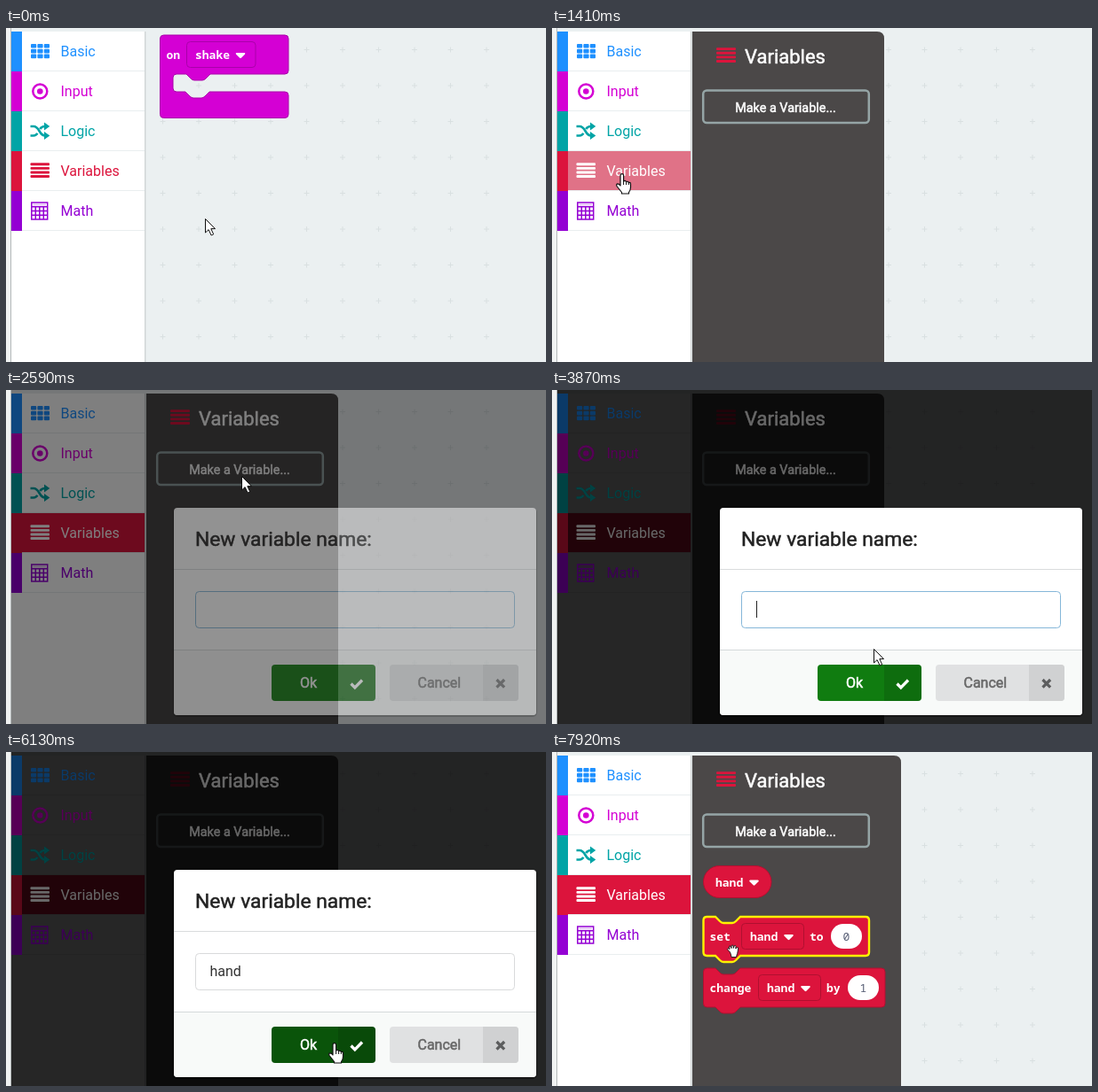
Animation, 608 px wide and 377 px high, one loop 8000 ms. Source, as an HTML page:

```html
<!DOCTYPE html>
<html lang="en">
<head>
<meta charset="utf-8">
<title>Make a variable</title>
<style>
  html, body { margin: 0; width: 100%; height: 100%; overflow: hidden; background: #ebf0f1; }
  svg { display: block; width: 608px; height: 377px; }
  text { font: 16px Roboto, sans-serif; white-space: pre; }
  .heavy { stroke: currentColor; stroke-width: .5px; fill: currentColor; }
  .block text { font: 700 13px "Noto Sans Mono", monospace; fill: #fff; }
  .block text.num { font-weight: 400; fill: #575e75; }
  .row.on { color: #fff; }
  .row text, .solid { fill: currentColor; }
  .line { fill: none; stroke: currentColor; }
</style>
</head>
<body>
<svg id="stage" viewBox="0 0 608 377" xmlns="http://www.w3.org/2000/svg"></svg>
<script>
const LOOP = 8000;
const RED = '#dc143c';
const $ = id => document.getElementById(id);
const repeat = (n, fn) => Array.from({ length: n }, (_, i) => fn(i)).join('');

const rect = (x, y, w, h, fill, extra = '') =>
  `<rect x="${x}" y="${y}" width="${w}" height="${h}" fill="${fill}" ${extra}/>`;
const path = (d, extra = '') => `<path d="${d}" ${extra}/>`;
const label = (x, y, s, extra = '') => `<text x="${x}" y="${y}" ${extra}>${s}</text>`;
const heavy = (x, y, s, size, color, extra = '') =>
  label(x, y, s, `class="heavy" style="font-size:${size}px;color:${color}" ${extra}`);
const bars = (x, y, w) => repeat(4, i => rect(x, y + i * 4.6, w, 2.9, 'currentColor', 'rx="1"'));

// Toolbox
const icons = [
  repeat(9, i => rect(28 + i % 3 * 7.4, 18 + Math.floor(i / 3) * 5.8, 6.2, 4.6, 'currentColor', 'rx="1"')),
  '<circle class="line" cx="38.3" cy="71.5" r="8" stroke-width="2.5"/><circle class="solid" cx="38.3" cy="71.5" r="3.3"/>',
  path('M27.5 111H31C38 111 37 121.5 44 121.5M27.5 121.5H31Q34 121.5 35.3 118.8M38.3 114Q40 111 44 111', 'class="line" stroke-width="2.6"') +
    path('M43 106.5 49.3 111 43 115.5ZM43 117 49.3 121.5 43 126Z', 'class="solid"'),
  bars(27.5, 152.3, 21.5),
  path('M28.8 197H46.7V216H28.8ZM28.8 201.8H46.7M28.8 206.5H46.7M28.8 211.3H46.7M33.3 201.8V216M37.8 201.8V216M42.3 201.8V216', 'class="line" stroke-width="1.5"') +
    rect(30.5, 198.5, 14.5, 1.8, 'currentColor', 'opacity=".25"')
];
const rows = [['Basic', '#1e90ff'], ['Input', '#d400d4'], ['Logic', '#00a4a6'], ['Variables', RED], ['Math', '#9400d3']];
const toolbox = rect(6, 4, 150, 373, '#fff') +
  rect(156, 4, 1, 373, '#cfd4d5') + rect(157, 4, 1, 373, '#e0e5e6') +
  repeat(5, i => rect(18, 48 + i * 45, 138, 1, '#e9eeef')) +
  rect(18, 139, 138, 44, RED, 'id="rowFill"') +
  '<g id="ink">' + rows.map(([name, color], i) =>
    rect(6, 4 + i * 45, 12, 45, color) +
    `<g class="row" ${i === 3 ? 'id="varRow"' : ''} color="${color}">${icons[i]}${label(61.5, 32 + i * 45, name)}</g>`
  ).join('') + '</g>';

// Blocks
const arrow = (x, y) => path(`M${x} ${y}h9q1.6.4.4 1.8l-4 4q-.9.8-1.8 0l-4-4q-1.2-1.4.4-1.8Z`, 'fill="#fff"');
const field = (x, y, w, name, edge) =>
  rect(x + .5, y + .5, w, 29, 'none', `rx="4" stroke="${edge}"`) +
  label(x + 10, y + 20, name) + arrow(x + w - 21, y + 13);
const statement = (id, y, w, word, fx, prep, px, num) => `<g id="${id}">` +
  path(`M170.5 ${y + 4}q0-4 4-4h9.5l5 5q2 2 4 2h10q2 0 4-2l5-5h${w - 46}q4 0 4 4v36q0 4-4 4h-${w - 46}l-5 5q-2 2-4 2h-10q-2 0-4-2l-5-5h-9.5q-4 0-4-4Z`,
    `class="edge" fill="${RED}"`) +
  label(177.5, y + 27, word) + field(fx, y + 7, 70, 'hand', '#b01030') +
  label(px, y + 27, prep) +
  rect(px + 24, y + 8, 35, 28, '#fff', 'rx="14"') + label(px + 37.5, y + 27, num, 'class="num"') + '</g>';

const shakeBlock = '<g class="block">' +
  path('M173.5 12q0-4 4-4H314q4 0 4 4V48q0 4-4 4H230l-5 5q-2 2-4 2H212q-2 0-4-2l-5-5H192q-4 0-4 4V68q0 4 4 4H202l5 5q2 2 4 2H220q2 0 4-2l5-5H314q4 0 4 4V97.500q0 4-4 4H177.500q-4 0-4-4Z',
    'fill="#d400d4" stroke="#aa00aa"') +
  label(180.5, 35, 'on') + field(203, 15, 77.5, 'shake', '#aa00aa') + '</g>';

const variableBlocks = '<g id="blocks" class="block">' +
  rect(170.5, 128.5, 76.500, 36, RED, 'rx="18" stroke="#b01030"') + label(184, 151.5, 'hand') + arrow(223, 144.5) +
  statement('setBlock', 186, 187, 'set', 213, 'to', 290, '0') +
  statement('changeBlock', 244, 205, 'change', 232, 'by', 309, '1') + '</g>';

const flyout = '<g id="flyout">' +
  path('', 'id="panel" fill="#4b4848"') +
  `<g color="${RED}">${bars(185, 22.2, 22)}</g>` +
  rect(170.2, 70.5, 186.600, 36.500, 'none', 'id="make" rx="4" stroke="#95a5a6" stroke-width="2.5"') +
  '<g id="panelText">' + heavy(217, 39.5, 'Variables', 22, '#fff') +
  heavy(263, 94.5, 'Make a Variable...', 14.4, '#fff', 'text-anchor="middle"') + '</g>' +
  variableBlocks + '</g>';

// Dialog
const dialog = '<g id="dialog">' +
  rect(188, 133, 410, 236, '#000', 'rx="5" opacity=".35"') +
  rect(189, 133, 408, 234, '#fff', 'rx="4"') +
  path('M189 293H597V363q0 4-4 4H193q-4 0-4-4Z', 'fill="#f8faf9"') +
  rect(189, 202, 408, 1, '#d9dcdd') + rect(189, 293, 408, 1, '#d5d9da') +
  heavy(213, 175.5, 'New variable name:', 22.8, '#222', 'stroke-width=".4"') +
  rect(213.5, 227.5, 359, 41, '#fff', 'id="input" rx="4"') +
  label(229.5, 253, '', 'id="typed" fill="#333"') + rect(230, 238, 1, 19, '#222', 'id="caret"') +
  rect(299, 310, 117, 41, '#107c10', 'id="ok" rx="4"') +
  path('M374 310H412q4 0 4 4V347q0 4-4 4H374Z', 'fill="#000" opacity=".12"') +
  heavy(331, 336, 'Ok', 16, '#fff') +
  path('M388.500 331.500l4.300 4.300 8.200-8.300', 'fill="none" stroke="#fff" stroke-width="3.3"') +
  rect(432, 310, 145, 41, '#e0e1e2', 'rx="4"') +
  path('M537 310H573q4 0 4 4V347q0 4-4 4H537Z', 'fill="#d0d1d2"') +
  heavy(463.500, 336, 'Cancel', 16, '#666', 'style="stroke-width:.3px"') +
  path('M552.500 327l8.600 8.600m0-8.600l-8.600 8.600', 'stroke="#5c5d5e" stroke-width="3.2"') + '</g>';

// Pointers, with the hot spot of each as its origin
const pointers = '<g id="pointer" fill="#fff" stroke="#111" stroke-linejoin="round">' +
  path('M.5.5V16l3.600-3.400 3 6.400 2.600-1.200-2.900-6.200H11.500Z', 'id="arrow"') +
  '<g id="hand" transform="translate(-7 0)">' +
  path('M5 14V2.500a1.800 1.800 0 0 1 3.600 0V9q1.700-1.400 3 .6 1.800-1 2.700.8 2.200-.6 2.200 1.800V16q0 3-2 5.500V23H6.500V21.500Q4.500 19 1 14.500 0 12 2 11.800q1.500 0 3 2.200Z', 'stroke-width="1.2"') +
  path('M8.600 9v4M11.600 10v3M14.300 11v2', 'fill="none"') + '</g>' +
  path('M3.500 9 1.200 6.600Q0 5 1.200 4.600 2 4.400 3 5.600L2.500 3Q2.600 1.300 4 2.200L5 4.500V1.700Q6 .2 7 1.500L7.300 4.400 8.300 1.600Q9.800.8 10 2.400L9.800 5 11.200 3.600Q13 3.200 12.700 5L11.700 10.500Q10.800 12 10.600 14.500H5Q4.800 12 3.500 9Z',
    'id="grab" transform="translate(-7 -7)" stroke-width=".9"') + '</g>';

const grid = repeat(10 * 9, i => `M${173.5 + i % 10 * 40.5} ${24.5 + Math.floor(i / 10) * 40.5}h6m-3-3v6`);

$('stage').innerHTML = rect(0, 0, 608, 377, '#ebf0f1') +
  path(grid, 'stroke="#d9e0e1" fill="none"') + shakeBlock + flyout + toolbox +
  rect(6, 0, 602, 377, '#000', 'id="dim"') +
  '<g id="ghost" opacity=".3"><use href="#ink"/><use href="#panelText"/></g>' +
  rect(0, 0, 5, 377, '#f1f3f3') + rect(5, 0, 1, 377, '#b3b8b9') + dialog + pointers;

// Pointer path: time, x, y
const moves = [
  [0, 224, 215], [60, 224, 215], [440, 79, 164],
  [1440, 79, 164], [1560, 110, 170], [1990, 264, 108], [2070, 264, 106], [2290, 265, 96],
  [2850, 265, 98], [3340, 274, 236], [3700, 274, 236], [3870, 362, 292],
  [5200, 362, 292], [5310, 362, 295], [5440, 362, 295], [5910, 370, 328],
  [6600, 370, 328], [6870, 249, 306], [7150, 170, 240], [7390, 183, 214],
  [7740, 183, 214], [7920, 204, 224], [LOOP, 204, 224]
];

// Moments at which the picture switches
const at = {
  select: 1030, open: 1110, fade: 2590, ask: 2670, press: 6050, close: 6190
};
const keys = [4490, 4550, 4710, 4770];
const caretOn = [[2670, 3040], [3570, 4100], [4490, 5300], [5830, 6050]];

function pointerAt(t) {
  const i = Math.max(1, moves.findIndex(m => m[0] > t));
  const [t0, x0, y0] = moves[i - 1], [t1, x1, y1] = moves[i];
  const k = (t - t0) / (t1 - t0);
  return [Math.round(x0 + (x1 - x0) * k), Math.round(y0 + (y1 - y0) * k)];
}

const set = (id, attrs) => {
  for (const name in attrs) $(id).setAttribute(name, attrs[name]);
};
const show = (id, on) => set(id, { display: on ? 'inline' : 'none' });

function render(t) {
  const [x, y] = pointerAt(t);
  const inside = (l, top, r, b) => x >= l && x < r && y >= top && y < b;
  const selected = t >= at.select, asking = t >= at.fade && t < at.close, done = t >= at.close;
  const settled = asking && t >= at.ask;

  const onRow = !asking && inside(6, 139, 156, 184);
  const onMake = !asking && selected && inside(169, 70, 358, 109);
  const onOk = asking && inside(299, 310, 416, 351);
  const onSet = done && inside(170, 186, 357, 231);
  const onChange = done && inside(170, 244, 375, 289);

  show('rowFill', selected);
  set('rowFill', { fill: onRow ? '#e07287' : RED });
  set('varRow', { class: selected ? 'row on' : 'row' });

  show('flyout', t >= at.open);
  show('blocks', done);
  set('panel', { d: `M156 4H${done ? 385 : 366}q8 0 8 8V377H156Z` });
  set('make', { fill: onMake ? '#95a5a6' : 'none' });
  for (const [id, on] of [['setBlock', onSet], ['changeBlock', onChange]]) {
    $(id).querySelector('.edge').setAttribute('style', on ? 'stroke:#fff200;stroke-width:2.4' : 'stroke:#b01030');
  }

  show('dim', asking);
  set('dim', { opacity: settled ? .85 : .5 });
  show('ghost', settled);
  show('dialog', asking);
  set('dialog', { opacity: settled ? 1 : .5 });

  const pressed = t >= at.press;
  const count = keys.filter(k => t >= k).length;
  $('typed').textContent = 'hand'.slice(0, count);
  set('input', { stroke: pressed ? '#d9dadb' : '#85b7d9' });
  show('caret', caretOn.some(([a, b]) => t >= a && t < b));
  set('caret', { x: 230 + count * 9 - (count > 3 ? 1 : 0) });
  set('ok', { fill: pressed ? '#0a540a' : onOk ? '#0d660d' : '#107c10' });

  const grabbing = onSet || onChange;
  const pointing = onRow || onMake || onOk || (done && t < 6650);
  set('pointer', { transform: `translate(${x} ${y})` });
  show('grab', grabbing);
  show('hand', pointing && !grabbing);
  show('arrow', !pointing && !grabbing);
}

const start = performance.now();
function tick() {
  render((performance.now() - start) % LOOP);
  requestAnimationFrame(tick);
}
tick();
</script>
</body>
</html>
```
